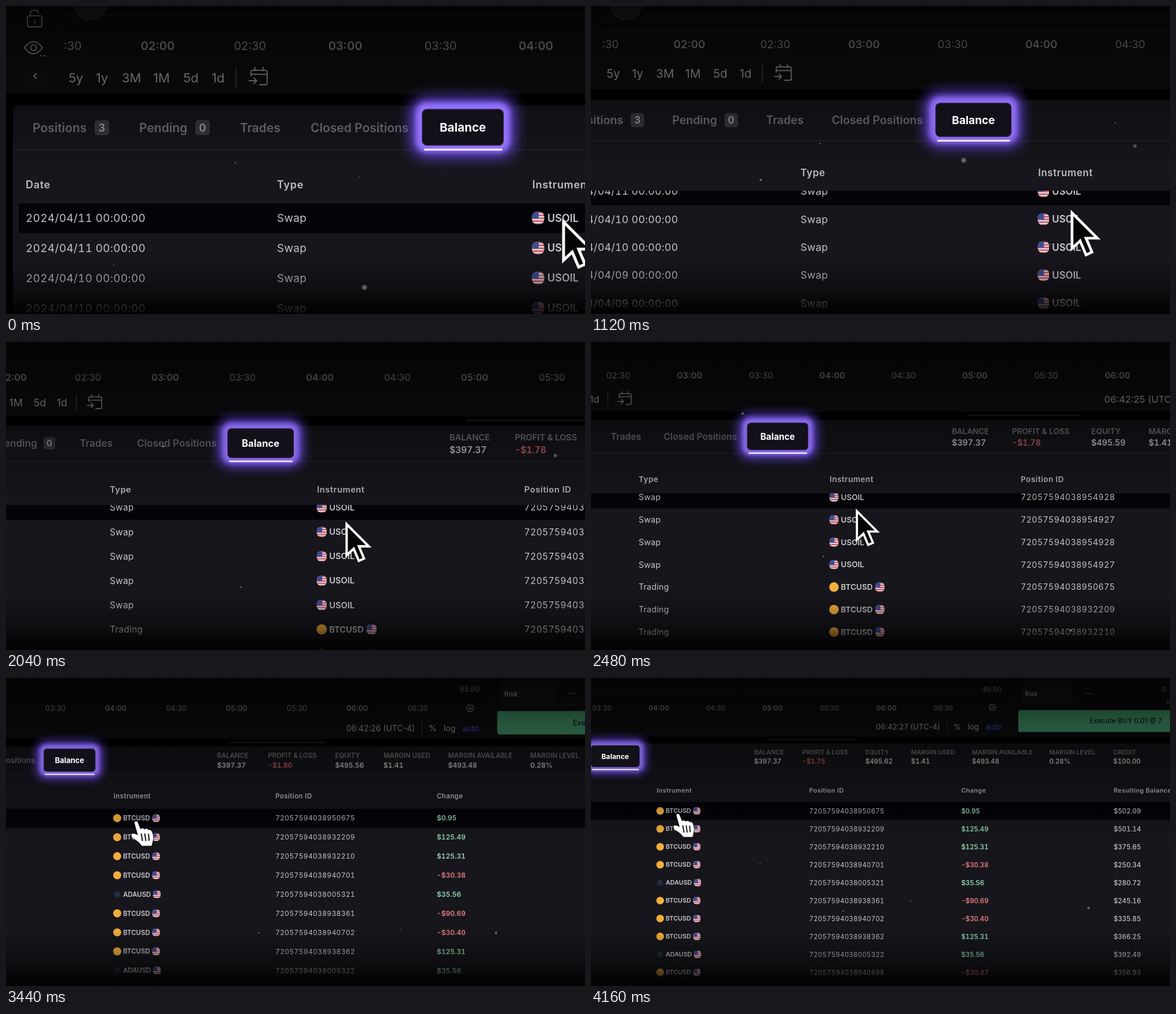
An HTML page for the animation above (4200 ms loop, 1000 px wide and 532 px high).

```html
<!DOCTYPE html>
<html lang="en">
<head>
<meta charset="utf-8">
<title>Balance history</title>
<style>
  html, body { margin: 0; width: 100%; height: 100%; overflow: hidden; background: #000; }
  svg { display: block; width: 100%; height: 100%; }
  text { font-family: Inter, "Open Sans", sans-serif; white-space: pre; }
  .num { font-variant-numeric: tabular-nums; letter-spacing: .3px; }
  .id { font-variant-numeric: tabular-nums; letter-spacing: .5px; }
  .money { font-variant-numeric: tabular-nums; }
  .head { letter-spacing: .7px; }
  .icon { fill: none; stroke: #a8a8ac; stroke-width: 2; stroke-linecap: round; stroke-linejoin: round; }
</style>
</head>
<body>
<svg viewBox="0 0 1000 532" preserveAspectRatio="none">
  <defs>
    <linearGradient id="shade" x1="0" y1="0" x2="0" y2="1">
      <stop offset="0" stop-color="#000" stop-opacity=".74"/>
      <stop offset=".09" stop-color="#000" stop-opacity=".65"/>
      <stop offset=".14" stop-color="#000" stop-opacity=".55"/>
      <stop offset=".24" stop-color="#000" stop-opacity=".45"/>
      <stop offset=".32" stop-color="#000" stop-opacity=".34"/>
      <stop offset=".42" stop-color="#000" stop-opacity=".18"/>
      <stop offset=".55" stop-color="#000" stop-opacity="0"/>
      <stop offset=".81" stop-color="#000" stop-opacity="0"/>
      <stop offset=".885" stop-color="#000" stop-opacity=".25"/>
      <stop offset=".93" stop-color="#000" stop-opacity=".45"/>
      <stop offset=".97" stop-color="#000" stop-opacity=".75"/>
      <stop offset="1" stop-color="#000" stop-opacity=".9"/>
    </linearGradient>
    <filter id="soft" x="-50%" y="-80%" width="200%" height="260%"><feGaussianBlur stdDeviation="5"/></filter>
    <filter id="wide" x="-50%" y="-80%" width="200%" height="260%"><feGaussianBlur stdDeviation="12"/></filter>
    <clipPath id="body"><rect x="-200" y="341" width="4000" height="900"/></clipPath>
    <clipPath id="badge"><rect x="-10.500" y="-10.500" width="21" height="21" rx="8"/></clipPath>
    <g id="flag" clip-path="url(#badge)">
      <rect x="-11" y="-11" width="22" height="22" fill="#e2d6dc"/>
      <path d="M-11-9.4h22m-22 5h22m-22 5h22m-22 5h22m-22 5h22" stroke="#c4505e" stroke-width="2.4"/>
      <rect x="-11" y="-11" width="12" height="12" fill="#3d4d96"/>
    </g>
  </defs>

  <g class="camera">
    <rect x="-200" y="-300" width="3600" height="452" fill="#101013"/>
    <rect x="12" y="172" width="3500" height="1000" rx="10" fill="#17161c"/>
    <path d="M100 45H1925M100 16H1925" stroke="#29292d" stroke-width="1.5"/>
    <path d="M1227 161h260" stroke="#1e1e22" stroke-width="4"/>
    <path d="M12 248H3500" stroke="#29282e" stroke-width="1.5"/>
    <circle cx="145" cy="-4" r="28" fill="#2c2c31" stroke="#55555b"/>
    <rect x="28" y="100" width="47" height="40" fill="#141417"/>
    <g class="icon">
      <rect x="37" y="17" width="25" height="19" rx="3"/>
      <path d="M42 17v-4q0-6 7-6t7 5M49.500 25v4"/>
      <path d="M32 72q15-21 31 0q-16 21-31 0z"/><circle cx="47.500" cy="72" r="5"/>
      <path d="M52 117l-4 4 4 4M60 86h1m5 0h1"/>
      <path d="M423 121v-7q0-3 3-3h22q3 0 3 3v19q0 3-3 3h-10M423 118h28M430 106v6M444 106v6M420 129h13m-5-5l5 5-5 5"/>
      <path d="M1876 59.500h10l5 8.500-5 8.500h-10l-5-8.500z"/><circle cx="1881" cy="68" r="3"/>
    </g>
    <path d="M397 106v34M1750 106v34" stroke="#505055" stroke-width="1.500"/>
    <rect x="1967" y="-4" width="1000" height="62" rx="6" fill="#19191d" stroke="#34343a"/>
    <rect x="2112" y="-4" width="900" height="62" rx="6" fill="#101013" stroke="#34343a"/>
    <path d="M2148 28h24" stroke="#77777c" stroke-width="2"/>
    <rect x="1955" y="75.500" width="1100" height="64" rx="6" fill="#50b882"/>
    <g id="labels"></g>
    <g clip-path="url(#body)">
      <rect id="hover" x="22" width="3500" height="52" fill="#040308"/>
      <g id="rows"></g>
    </g>
  </g>

  <rect width="1000" height="532" fill="url(#shade)"/>

  <g class="camera">
    <g id="glow">
      <rect x="699" y="158" width="180" height="103" rx="26" fill="#5f40d0" filter="url(#wide)"/>
      <rect x="708" y="167" width="162" height="85" rx="18" fill="#9673fb" filter="url(#soft)"/>
    </g>
    <rect x="719" y="178.500" width="140" height="62" rx="8" fill="#121018" stroke="#2a2148" stroke-width="1.500"/>
    <rect x="722" y="246.500" width="135" height="3.200" fill="#f1edff"/>
    <g id="tab"></g>
  </g>

  <g id="specks"></g>

  <g class="camera">
    <g id="pointer">
      <path id="arrow" d="M2 5V71L17 57 28 83 39 78 28 52H49Z" fill="#050507" stroke="#fff" stroke-width="5"/>
      <g id="hand" transform="scale(.9)">
        <path d="M-5 4Q-3-5 5 0L14 22Q20 17 26 23Q33 18 38 25Q46 22 50 33Q56 48 51 62L48 74H18Q10 62-4 54Q-18 46-13 37Q-8 33 5 40Z" fill="#fff" stroke="#111" stroke-width="1.500"/>
        <path d="M16 36L20 59M27 36L30 59M38 37L40 58" stroke="#111" stroke-width="3.500"/>
      </g>
    </g>
  </g>
</svg>
<script>
const NS = 'http://www.w3.org/2000/svg';
const $ = id => document.getElementById(id);
const LOOP = 4200, STEP = 40;
const PITCH = 51.9, FIRST_ROW = 366;
const COLUMNS = [34, 468, 909, 1350, 1790, 2231];
const ORIGIN = { x: -1065, y: 25 };

function add(parent, tag, attrs) {
  const el = document.createElementNS(NS, tag);
  for (const key in attrs) el.setAttribute(key, attrs[key]);
  return parent.appendChild(el);
}

// y is the middle of the capital letters
function write(parent, x, y, string, size, fill, weight = 400, extra = {}) {
  const el = add(parent, 'text', {
    x, y: y + size * 0.364, 'font-size': size, 'font-weight': weight, fill, ...extra
  });
  el.textContent = string;
  return el;
}

const labels = $('labels');
const middle = { 'text-anchor': 'middle' };

// Chart axis and toolbar
write(labels, 100, 69, ':30', 20, '#a8a8ac');
for (let half = 4; half <= 13; half++) {
  const x = half === 4 ? 262 : 586 + 164.6 * (half - 6);
  const name = `0${half >> 1}:${half % 2 ? '30' : '00'}`;
  write(labels, x, 69, name, 20, '#a8a8ac', half % 2 ? 400 : 600, middle);
}
[['5y', 108], ['1y', 155], ['3M', 200], ['1M', 254], ['5d', 306], ['1d', 355], ['%', 1768], ['log', 1809]]
  .forEach(([name, x]) => write(labels, x, 123.5, name, 22, '#bcbcc0'));
write(labels, 1860, 123.5, 'auto', 22, '#4a5cf0');
write(labels, 1853, 16, '85.60', 20, '#a8a8ac');
const clock = write(labels, 1543, 123.5, '', 22, '#bcbcc0');

// Order panel
write(labels, 1974, 29, 'Risk', 18, '#c8c8cc', 600);
write(labels, 2371, 17, '0.', 19, '#c8c8cc');
write(labels, 2384, 52, 'le', 18, '#88888c');
write(labels, 2161, 107, 'Execute BUY 0.01 @ 7', 20, '#0c1c14', 500);

// Tabs
[['Positions', 46], ['Pending', 230], ['Trades', 404], ['Closed Positions', 526]]
  .forEach(([name, x]) => write(labels, x, 210, name, 21, '#77777c', 600));
[['3', 165.5], ['0', 339.5]].forEach(([count, x]) => {
  add(labels, 'rect', { x: x - 12.5, y: 197, width: 25, height: 26, rx: 5, fill: '#3a3a3f' });
  write(labels, x, 210, count, 18, '#b0b0b5', 600, middle);
});
write($('tab'), 789, 210, 'Balance', 20.5, '#fff', 700, middle);

// Account figures
const stat = (x, name, value, fill = '#d2d2d6') => {
  write(labels, x, 197.5, name, 18, '#7f7f84', 600);
  return write(labels, x, 223.5, value, 19, fill, 600, { class: 'money' });
};
stat(1191, 'BALANCE', '$397.37');
const profit = stat(1330, 'PROFIT & LOSS', '', '#d0606a');
const equity = stat(1513, 'EQUITY', '');
stat(1645, 'MARGIN USED', '$1.41');
stat(1821, 'MARGIN AVAILABLE', '$493.48');
stat(2045, 'MARGIN LEVEL', '0.28%');
stat(2230, 'CREDIT', '$100.00');

// Table
['Date', 'Type', 'Instrument', 'Position ID', 'Change', 'Resulting Balance']
  .forEach((name, i) => write(labels, COLUMNS[i], 308, name, 18, '#bdbdc2', 600, { class: 'head' }));

const swaps = Array.from({ length: 8 }, (_, i) =>
  ['USOIL', i % 2 ? '954927' : '954928', i % 2 ? -0.11 : -0.48, '']);
const trades = [
  ['BTCUSD', '950675', 0.95, '$502.09'],
  ['BTCUSD', '932209', 125.49, '$501.14'],
  ['BTCUSD', '932210', 125.31, '$375.65'],
  ['BTCUSD', '940701', -30.38, '$250.34'],
  ['ADAUSD', '005321', 35.56, '$280.72'],
  ['BTCUSD', '938361', -90.69, '$245.16'],
  ['BTCUSD', '940702', -30.40, '$335.85'],
  ['BTCUSD', '938362', 125.31, '$366.25'],
  ['ADAUSD', '005322', 35.56, '$392.49'],
  ['BTCUSD', '940698', -30.47, '$356.93']
];

const rows = $('rows');
const flag = (x, y) => add(rows, 'use', { href: '#flag', x, y });

[...swaps, ...trades].forEach(([symbol, id, change, balance], i) => {
  const y = FIRST_ROW + i * PITCH;
  const swap = symbol === 'USOIL';
  const cell = (column, string, style, fill = '#c4c4c9', weight = 400) =>
    write(rows, COLUMNS[column], y, string, 19, fill, weight, { class: style });
  const day = String(11 - (i >> 1)).padStart(2, '0');
  cell(0, `2024/04/${day} 00:00:00`, 'num');
  cell(1, swap ? 'Swap' : 'Trading', 'num');
  write(rows, 935, y, symbol, 18, '#c9c9ce', 600);
  if (swap) flag(919, y);
  else {
    const coin = symbol === 'BTCUSD';
    add(rows, 'circle', { cx: 919, cy: y, r: coin ? 11 : 9, fill: coin ? '#f2ae3c' : '#202c42' });
    flag(coin ? 1025 : 1027, y);
  }
  cell(3, '72057594038' + id, 'id');
  cell(4, (change < 0 ? '-$' : '$') + Math.abs(change).toFixed(2), 'money', change < 0 ? '#e67c80' : '#8ed4ae', 600);
  cell(5, balance, 'money', undefined, 500);
});

// Dust: x and y at a time, speed, radius, strength, first and last moment
const dust = [
  [619, 486, 0, 22, -196, 4, .5, 0, 1.3],
  [829, 498, 2.48, 18, -60, 2.2, .45, 2.1, 4.2],
  [437, 463, 3, -1, -52, 1.4, .45, 2.6, 4.2],
  [410, 481, 1.56, -9, -120, 1.4, .5, 1.3, 3.3],
  [396, 271, 0, 0, -30, 1.4, .4, 0, 1.2],
  [944, 220, 1.56, 10, -50, 3, .35, 1, 2.2],
  [283, 243, 1.56, -23, -130, 2, .5, 1, 2.6],
  [793, 417, .72, 0, -13, 1.5, .4, .4, 2],
  [902, 218, .72, 8, -40, 1.4, .35, .3, 1.3],
  [611, 294, 0, 5, -40, 1.2, .4, 0, .6],
  [186, 448, 0, 76, -86, 1.2, .4, 0, .9],
  [681, 435, 3.44, -8, -30, 1.2, .3, 3.1, 3.9],
  [552, 385, 4.16, 6, -40, 1.3, .4, 3.7, 4.2],
  [292, 321, 4.16, 4, -30, 1.3, .4, 3.7, 4.2]
].map(d => ({ d, el: add($('specks'), 'circle', { r: d[5], fill: '#c9bfae' }) }));
dust[0].el.setAttribute('filter', 'blur(1px)');

const zoomKeys = [[0, 1], [.72, .969], [1.56, .878], [2.48, .7483], [3, .6798], [3.44, .6336], [4.16, .597]];
const scrollKeys = [[0, 0], [.72, 37.9], [1.56, 120.1], [2.48, 223.9], [3, 327.4], [3.44, 413.6], [4.2, 413.6]];
const END_SLOPE = -0.015;

function segment(keys, t) {
  let i = 0;
  while (i < keys.length - 2 && t >= keys[i + 1][0]) i++;
  const [t0, a] = keys[i], [t1, b] = keys[i + 1];
  return { i, a, b, h: t1 - t0, u: Math.min(1, (t - t0) / (t1 - t0)) };
}

const ease = (a, b, u) => a + (b - a) * u * u * (3 - 2 * u);

function eased(keys, t) {
  const { a, b, u } = segment(keys, t);
  return ease(a, b, u);
}

function spline(keys, t) {
  const { i, a, b, h, u } = segment(keys, t);
  const slope = k => k === 0 || k === keys.length - 1 ? END_SLOPE :
    (keys[k + 1][1] - keys[k - 1][1]) / (keys[k + 1][0] - keys[k - 1][0]);
  const v = 1 - u;
  return ease(a, b, u) + h * u * v * (v * slope(i) - u * slope(i + 1));
}

const pick = (t, times, values) => values[times.filter(x => t >= x).length];
const cameras = document.querySelectorAll('.camera');

function draw(t) {
  const s = spline(zoomKeys, t);
  const view = `translate(${ORIGIN.x * (1 - s)} ${ORIGIN.y * (1 - s)}) scale(${s})`;
  cameras.forEach(el => el.setAttribute('transform', view));

  const scroll = eased(scrollKeys, t);
  rows.setAttribute('transform', `translate(0 ${-scroll})`);
  $('hover').setAttribute('y', FIRST_ROW - 26 + Math.round(scroll / PITCH) * PITCH - scroll);

  const settle = Math.min(1, t / .7);
  $('pointer').setAttribute('transform', `translate(${961 + 9 * settle} ${368 + 9 * settle})`);
  const pointing = t >= 3.32;
  $('arrow').style.display = pointing ? 'none' : '';
  $('hand').style.display = pointing ? '' : 'none';
  $('glow').style.opacity = 1 - .04 * t;

  clock.textContent = `06:42:${pick(t, [2.08, 3.08, 4.08], [24, 25, 26, 27])} (UTC-4)`;
  profit.textContent = pick(t, [2.76, 3.2, 3.8], ['-$1.78', '-$1.73', '-$1.80', '-$1.75']);
  equity.textContent = pick(t, [2.76, 3.2, 3.8], ['$495.59', '$495.63', '$495.56', '$495.62']);

  for (const { d: [x, y, at, vx, vy, , strength, from, to], el } of dust) {
    el.setAttribute('cx', x + vx * (t - at));
    el.setAttribute('cy', y + vy * (t - at));
    el.setAttribute('opacity', t >= from && t <= to ? strength : 0);
  }
}

const start = performance.now();
function tick() {
  const ms = Math.max(0, performance.now() - start) % LOOP;
  draw(Math.floor(ms / STEP) * STEP / 1000);
  requestAnimationFrame(tick);
}
tick();
</script>
</body>
</html>
```
